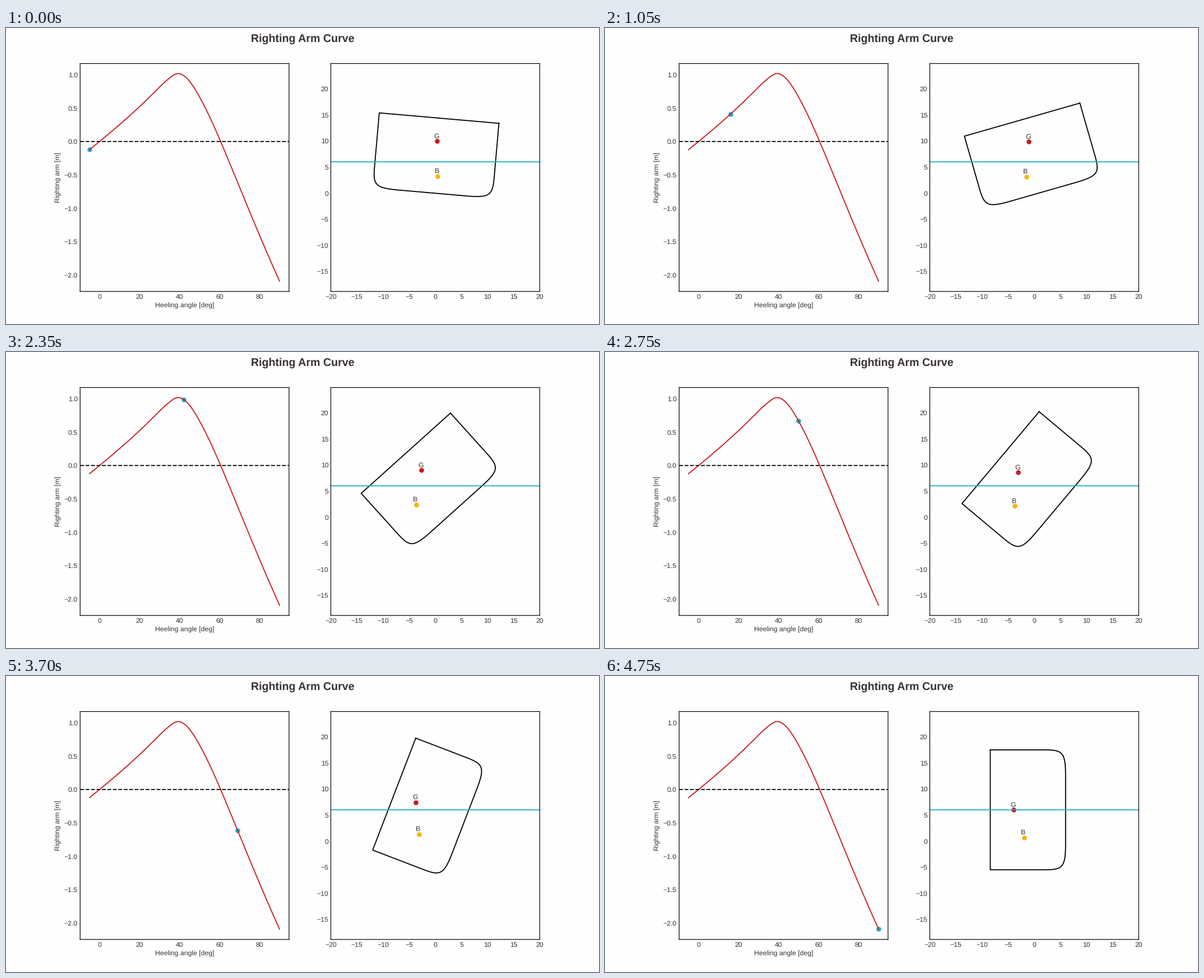
A matplotlib script that plays this animation: 1058 by 529 pixels, repeating every 4.8 s.

```python
import numpy as np
import matplotlib.pyplot as plt
from matplotlib.animation import FuncAnimation

RED, CYAN, YELLOW = "#c81920", "#22aecb", "#f5b70a"
TEXT, PAPER = "#383037", "#fefefe"

plt.rcParams.update({
    "font.family": "Liberation Sans",
    "font.size": 10,
    "text.hinting": "none",
    "text.color": TEXT,
    "path.snap": False,
    "axes.labelcolor": TEXT,
    "axes.linewidth": 1.0,
    "axes.facecolor": PAPER,
    "figure.facecolor": PAPER,
    "xtick.color": TEXT,
    "ytick.color": TEXT,
    "xtick.major.size": 0,
    "ytick.major.size": 0,
    "lines.linewidth": 1.5,
})

FIRST, LAST = -5, 90            # heel range in degrees
WATERLINE = 6.0
G_HEIGHT = 4.0                  # centre of gravity above the waterline
B_UPRIGHT, B_CAPSIZED = 3.26, 0.65
HALF_BEAM, DEPTH = 11.5, 14.42


def righting_arm(angle):
    """Cubic Hermite curve through (angle, arm, slope) key points."""
    xs, ys, slopes = np.array([
        (FIRST, -0.122, 0.0243), (25, 0.666, 0.0295), (37, 0.994, 0.020),
        (50, 0.666, -0.054), (69, -0.611, -0.073), (LAST, -2.09, -0.066)]).T
    i = np.clip(np.searchsorted(xs, angle) - 1, 0, len(xs) - 2)
    h = xs[i + 1] - xs[i]
    t = (angle - xs[i]) / h
    blend = t * t * (3 - 2 * t)
    return (ys[i] + blend * (ys[i + 1] - ys[i])
            + t * (1 - t) * h * ((1 - t) * slopes[i] - t * slopes[i + 1]))


def gravity_centre(angle):
    a = np.radians(angle)
    return -G_HEIGHT * np.sin(a), WATERLINE + G_HEIGHT * np.cos(a)


def buoyancy_centre(angle):
    """Lies one righting arm to the left of the centre of gravity."""
    upright = np.clip(np.cos(np.radians(angle)), 0, 1) ** 1.3
    return (gravity_centre(angle)[0] - righting_arm(angle),
            B_CAPSIZED + (B_UPRIGHT - B_CAPSIZED) * upright)


def hull_section():
    """Midship section with Bezier bilges and the keel at height zero."""
    t = np.linspace(0, 1, 40)[:, None]
    p0, p1, p2, p3 = np.array([
        (HALF_BEAM, 4.2), (HALF_BEAM, 0.65), (11.2, 0), (6.5, 0)])
    bilge = ((1 - t) ** 3 * p0 + 3 * t * (1 - t) ** 2 * p1
             + 3 * t * t * (1 - t) * p2 + t ** 3 * p3)
    right = np.vstack([(HALF_BEAM, DEPTH), bilge])
    left = right[::-1] * (-1, 1)
    return np.vstack([right, left, right[:1]])


def heel(points, angle):
    """Rotate about the midpoint of the waterline."""
    a = np.radians(angle)
    x, y = points[:, 0], points[:, 1] - WATERLINE
    return (x * np.cos(a) - y * np.sin(a),
            WATERLINE + x * np.sin(a) + y * np.cos(a))


fig, (arm_ax, hull_ax) = plt.subplots(1, 2, figsize=(12, 6), dpi=88.167)
fig.suptitle("Righting Arm Curve", fontsize=16, fontweight="bold")

angles = np.linspace(FIRST, LAST, 400)
arm_ax.plot(angles, righting_arm(angles), color=RED)
arm_ax.axhline(0, color="black", ls="--")
arm_ax.set(xlim=(-9.75, 94.75), ylim=(-2.245, 1.167),
           xticks=range(0, 81, 20), yticks=np.arange(-2, 1.1, 0.5),
           xlabel="Heeling angle [deg]", ylabel="Righting arm [m]")
arm_dot = arm_ax.scatter([0], [0], color=CYAN, zorder=1)

box = hull_ax.get_window_extent()
half_height = 20 * box.height / box.width
hull_ax.set(xlim=(-20, 20), ylim=(3 - half_height, 3 + half_height),
            xticks=range(-20, 21, 5), yticks=range(-15, 21, 5))
hull_line, = hull_ax.plot([], [], color="black", solid_joinstyle="round")
hull_ax.axhline(WATERLINE, color=CYAN)
section = hull_section()


def labelled_dot(name, color):
    return (hull_ax.scatter([0], [0], color=color, zorder=1),
            hull_ax.text(0, 0, name))


def place(dot, label, position):
    x, y = position
    dot.set_offsets([(x, y)])
    label.set_position((x - 0.6, y + 0.6))


gravity = labelled_dot("G", RED)
buoyancy = labelled_dot("B", YELLOW)


def update(frame):
    angle = FIRST + frame
    arm_dot.set_offsets([(angle, righting_arm(angle))])
    hull_line.set_data(*heel(section, angle))
    place(*gravity, gravity_centre(angle))
    place(*buoyancy, buoyancy_centre(angle))
    return arm_dot, hull_line, *gravity, *buoyancy


anim = FuncAnimation(fig, update, frames=LAST - FIRST + 1, interval=50,
                     repeat=True, repeat_delay=0)
plt.show()
```
